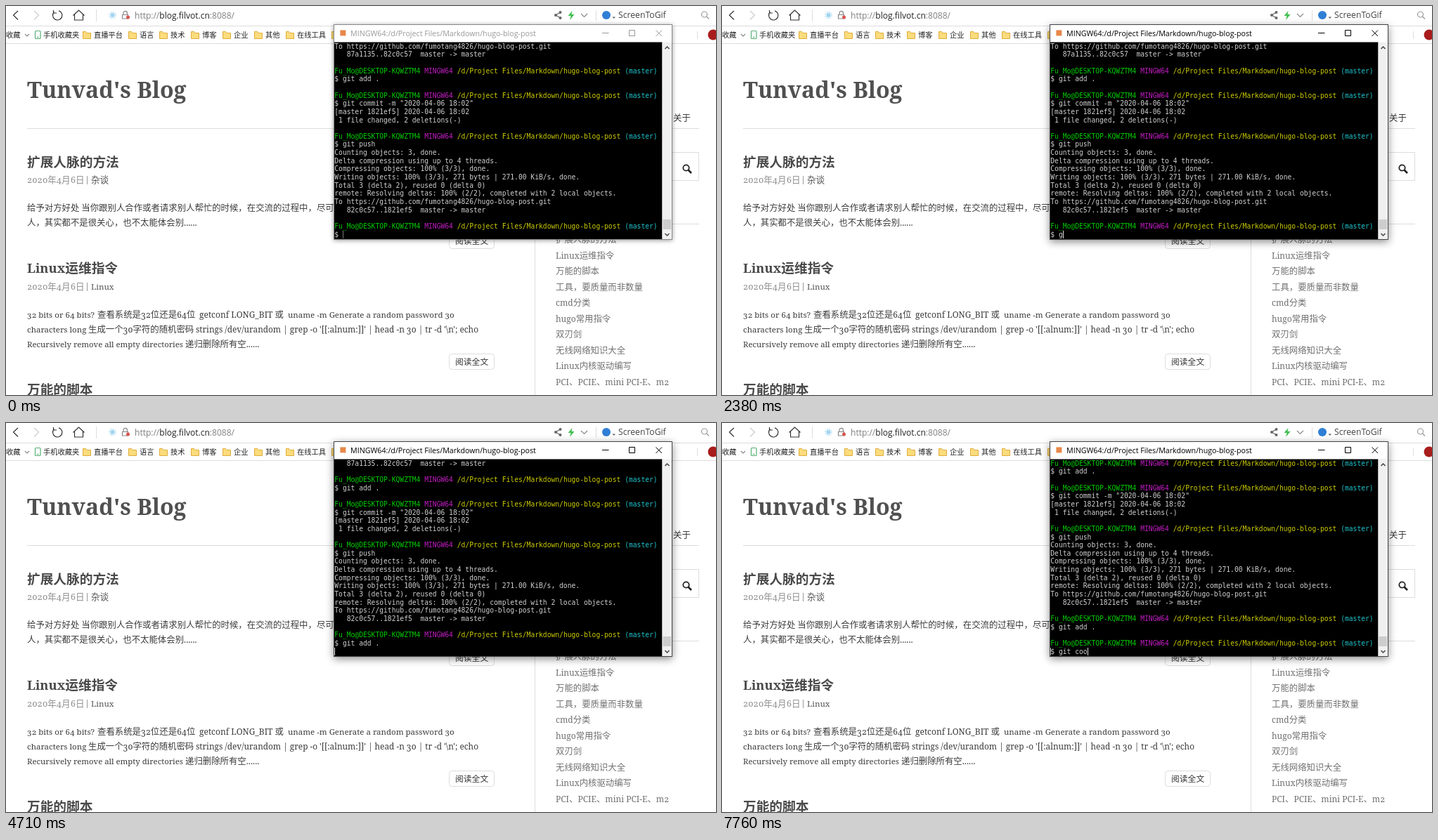
An HTML page for the animation above (7990 ms loop, 1010 by 554 pixels).

```html
<!DOCTYPE html>
<html lang="zh-CN">
<head>
<meta charset="utf-8">
<title>Blog and terminal</title>
<style>
html, body { margin: 0; width: 100%; height: 100%; overflow: hidden; background: #fff; }
svg { display: block; width: 1010px; height: 554px; }
text { white-space: pre; }
.cjk { font-family: "Noto Sans CJK SC", "Noto Sans CJK JP", sans-serif; }
.serif { font-family: "Noto Serif", serif; font-variant-numeric: oldstyle-nums; }
.ui { font-family: "Open Sans", sans-serif; }
.mono { font-family: "DejaVu Sans Mono", monospace; font-size: 9.66px; fill: #d0d0d0; }
.line { fill: none; stroke: #ddd; }
</style>
</head>
<body>
<svg viewBox="0 0 1010 554">
  <rect width="1010" height="554" fill="#fff"/>
  <g id="page"></g>
  <g id="bar"></g>
  <path id="mouse" d="M0 0V16L3.7 12.6L6.3 18.6L8.7 17.6L6.2 11.7H11.5Z" fill="#fff" stroke="#000" stroke-width=".9"/>
  <g id="win">
    <rect id="frame" x="466" y="26" width="482" height="307" fill="#fff"/>
    <rect x="475.4" y="34.4" width="8" height="8" fill="#e8884a"/>
    <text id="title" class="ui" x="490" y="42.5" font-size="10.7">MINGW64:/d/Project Files/Markdown/hugo-blog-post</text>
    <path id="ctrl" d="M848 38.5H857.5M886.5 34.5H894.5V42.5H886.5ZM924.5 34.5L933 43M933 34.5L924.5 43" fill="none"/>
    <rect x="467" y="51.5" width="466.5" height="280.5" fill="#000"/>
    <rect x="933.5" y="51.5" width="13.5" height="280.5" fill="#f0f0f0"/>
    <rect x="934.5" y="304" width="11.5" height="14" fill="#cdcdcd"/>
    <path d="M937.5 61L940.5 58L943.5 61M937.5 324L940.5 327L943.5 324" fill="none" stroke="#444" stroke-width="1.5"/>
    <g id="term"></g>
    <rect id="ghost" x="467" y="320" width="1" height="11" fill="#bfbfbf"/>
    <rect id="caret" y="320" width="1" height="11"/>
    <rect id="edge" x="466.5" y="26.5" width="481" height="306" fill="none"/>
  </g>
</svg>
<script>
const $ = id => document.getElementById(id);
const LOOP = 7990;

// Page text: Chinese and Latin runs use different fonts and sizes.
function mix(x, y, str, fill = '#444', size = 12.4, latin = 11.5, weight = 400) {
  const runs = str.match(/[\u3000-\u9fff\uff00-\uffef]+|[^\u3000-\u9fff\uff00-\uffef]+/g);
  const spans = runs.map(r => /[\u3000-\uffef]/.test(r)
    ? `<tspan class="cjk" font-size="${size}">${r}</tspan>`
    : `<tspan class="serif" font-size="${latin}">${r}</tspan>`);
  return `<text x="${x}" y="${y}" fill="${fill}" font-weight="${weight}">${spans.join('')}</text>`;
}
const line = d => `<path class="line" d="${d}"/>`;
const heading = (y, str) => mix(30, y, str, '#4a4a4a', 18.7, 18.2, 700);
const body = (x, y, str, latin) => mix(x, y, str, '#3c3c3c', 12.4, latin);
const meta = (y, tag) => mix(30, y, '2020年4月6日', '#8f8f8f', 12.6, 12.6)
  + `<path d="M115.5 ${y - 10}v12" stroke="#999"/>` + mix(121, y, tag, '#555', 12.6, 11.6);
const button = y => `<rect class="line" x="630.5" y="${y}.5" width="64" height="22" rx="4"/>`
  + mix(639, y + 16, '阅读全文', '#333', 11.8);

const links = ['扩展人脉的方法', 'Linux运维指令', '万能的脚本', '工具，要质量而非数量', 'cmd分类',
  'hugo常用指令', '双刃剑', '无线网络知识大全', 'Linux内核驱动编写', 'PCI、PCIE、mini PCI-E、m2'];

$('page').innerHTML = [
  mix(30, 130.5, "Tunvad's Blog", '#505050', 32, 32, 700),
  line('M30 174.5H986M782 310.5H986M752.5 200V554M782 208.5H985.5V248.5H782'),
  mix(949, 164, '关于', '#333', 12.4),
  '<g fill="none" stroke="#222"><circle cx="967.5" cy="230.5" r="4.2" stroke-width="1.8"/><path d="M970.5 233.5L975 238" stroke-width="2.6"/></g>',
  heading(229, '扩展人脉的方法'), meta(252, '杂谈'),
  body(30, 291.5, '给予对方好处 当你跟别人合作或者请求别人帮忙的时候，在交流的过程中，尽可'),
  body(30, 312.5, '人，其实都不是很关心，也不太能体会别......', 12.4),
  button(323),
  heading(380, 'Linux运维指令'), meta(404, 'Linux'),
  body(30, 444, '32 bits or 64 bits?'), body(130, 444, '查看系统是32位还是64位', 12),
  body(275, 444, 'getconf LONG_BIT 或', 12), body(401, 444, 'uname -m Generate a random password 30'),
  body(30, 465, 'characters long'), body(117, 465, '生成一个30字符的随机密码', 12),
  body(270, 465, "strings /dev/urandom | grep -o '[[:alnum:]]' | head -n 30 | tr -d '\\n'; echo", 11.85),
  body(30, 485.5, 'Recursively remove all empty directories', 11.35), body(255, 485.5, '递归删除所有空......', 12.4),
  button(495),
  heading(553, '万能的脚本'),
  ...links.map((s, i) => mix(782, 337 + i * 22.5, s, '#707070', 12.4, 12))
].join('');

// Browser toolbar and bookmarks
const ui = (x, y, size, str, fill) => `<text class="ui" x="${x}" y="${y}" font-size="${size}" fill="${fill}">${str}</text>`;
const mark = (x, str) => mix(x, 45, str, '#222', 10.25);
const folder = x => `<path transform="translate(${x} 36)" d="M.5 .5H4.5L6 2.5H11.5V10.5H.5Z" fill="#fbdc7d" stroke="#dfac3a"/>`;
const folders = [[109, '直播平台'], [174, '语言'], [218, '技术'], [263, '博客'], [308, '企业'], [353, '其他'], [398, '在线工具'], [463, '']];

$('bar').innerHTML = [
  line('M0 28.5H1010M0 53.5H1010M128.5 5V22M839.5 6V21M983.5 36V47'),
  `<g fill="none" stroke="#333" stroke-width="1.2">
    <path d="M17 7L10.5 13L17 19.5"/><path d="M40 7L46.5 13L40 19.5" stroke="#ccc"/>
    <path d="M68.5 8.5A6.7 6.7 0 1 0 75 6.8M67.5 6V10H72"/>
    <path d="M95.5 13.5L103.5 6L111.5 13.5M97.5 12V20H109.5V12"/>
    <path d="M818 11L822.5 15.5L827 11" stroke="#888"/>
    <path d="M788.5 9L782 13L788.5 17" stroke="#666"/>
    <circle cx="993.5" cy="12" r="4" stroke="#999"/><path d="M996.5 15L1000 18.5" stroke="#999"/>
    <path d="M27 40L30 43L33 40" stroke="#888"/>
    <rect x="41.5" y="35.5" width="7.5" height="11" rx="1" stroke="#58b076"/><path d="M44 44.5H46.5" stroke="#58b076"/>
    <path d="M167 12V10A2.7 2.7 0 0 1 172.4 10V12M165.5 12.5H173.5V18H165.5Z" stroke="#888"/>
    <circle cx="151.5" cy="13" r="4.5" stroke="#c5e4f4" stroke-width="2" stroke-dasharray="2 1.5"/>
  </g>`,
  '<circle cx="151.5" cy="13" r="3" fill="#9fd3ef"/><circle cx="173.5" cy="16" r="2.5" fill="#d9534f"/>',
  '<g fill="#666"><circle cx="788.5" cy="9" r="2"/><circle cx="782" cy="13" r="2"/><circle cx="788.5" cy="17" r="2"/></g>',
  '<path d="M805.5 7L799.5 14H803.5L802 20L808.5 12H804.5Z" fill="#3fbf4f"/>',
  '<circle cx="854" cy="13" r="6" fill="#2f7fd6"/><path d="M862.5 15.5H867L864.8 18Z" fill="#666"/>',
  '<circle cx="1006" cy="41" r="7.5" fill="#a81c1c"/>',
  ui(183, 17.5, 12.04, 'http://<tspan fill="#222">blog.filvot.cn</tspan>:8088/', '#808080'),
  ui(871, 17, 12.2, 'ScreenToGif', '#444'),
  mark(0, '收藏'), mark(53, '手机收藏夹'),
  ...folders.map(([x, s]) => folder(x) + (s && mark(x + 16, s)))
].join('');

// Terminal
const COL = 5.815, ROW = 11.64, ROWS = 24;
const paint = (fill, s) => `<tspan fill="${fill}">${s}</tspan>`;
const prompt = [paint('#00cc00', 'Fu_Mo@DESKTOP-KQWZTM4'), paint('#c41cc4', 'MINGW64'),
  paint('#cccc00', '/d/Project Files/Markdown/hugo-blog-post'), paint('#1cc4cc', '(master)')].join(' ');
const remote = 'To https://github.com/fumotang4826/hugo-blog-post.git';
const log = [
  remote, '   87a1135..82c0c57  master -&gt; master', '',
  prompt, '$ git add .', '',
  prompt, '$ git commit -m "2020-04-06 18:02"', '[master 1821ef5] 2020-04-06 18:02', ' 1 file changed, 2 deletions(-)', '',
  prompt, '$ git push', 'Counting objects: 3, done.', 'Delta compression using up to 4 threads.',
  'Compressing objects: 100% (3/3), done.', 'Writing objects: 100% (3/3), 271 bytes | 271.00 KiB/s, done.',
  'Total 3 (delta 2), reused 0 (delta 0)', 'remote: Resolving deltas: 100% (2/2), completed with 2 local objects.',
  remote, '   82c0c57..1821ef5  master -&gt; master', '',
  prompt
];
const FOCUS = 1370, ENTER = 4710, READY = 5490;
const addKeys = [2380, 2460, 2610, 3070, 3390, 3620, 3770, 3920, 4480];
const commitKeys = [6670, 6750, 6830, 6980, 7380, 7680, 7760];
const typed = (str, keys, t) => '$ ' + str.slice(0, keys.filter(k => k <= t).length);

$('term').innerHTML = Array.from({ length: ROWS }, (_, i) =>
  `<text class="mono" x="467.3" y="${Math.round(60.8 + i * ROW)}"></text>`).join('');
const rows = [...$('term').children];
let shown = '';

function drawTerm(t) {
  const first = typed('git add .', addKeys, t);
  const second = typed('git coo', commitKeys, t);
  const scroll = t < ENTER ? 0 : t < READY ? 1 : 3;
  const col = [first.length, 0, 0, second.length][scroll];
  $('caret').setAttribute('x', Math.round(467.3 + col * COL));
  $('caret').setAttribute('fill', t < FOCUS ? '#777' : '#e0e0e0');
  $('ghost').style.display = t < READY ? 'none' : '';
  const key = scroll + first + second;
  if (key === shown) return;
  shown = key;
  const lines = [...log, first, '', prompt, second];
  rows.forEach((row, i) => { row.innerHTML = lines[i + scroll]; });
}

function drawWindow(t) {
  const active = t >= FOCUS;
  $('title').setAttribute('fill', active ? '#000' : '#999');
  $('ctrl').setAttribute('stroke', active ? '#000' : '#999');
  $('edge').setAttribute('stroke', active ? '#444' : '#888');
  $('frame').style.filter = active
    ? 'drop-shadow(0 3px 6px rgba(0,0,0,.45))' : 'drop-shadow(0 1px 3px rgba(0,0,0,.4))';
}

function drawMouse(t) {
  const seen = t >= 130 && t < 280;
  $('mouse').style.display = seen ? '' : 'none';
  $('mouse').setAttribute('transform', t < 205 ? 'translate(873 460)' : 'translate(802.5 371.5)');
}

function render(t) {
  drawMouse(t);
  drawWindow(t);
  drawTerm(t);
}

function tick() {
  render(performance.now() % LOOP);
  requestAnimationFrame(tick);
}
tick();
</script>
</body>
</html>
```
